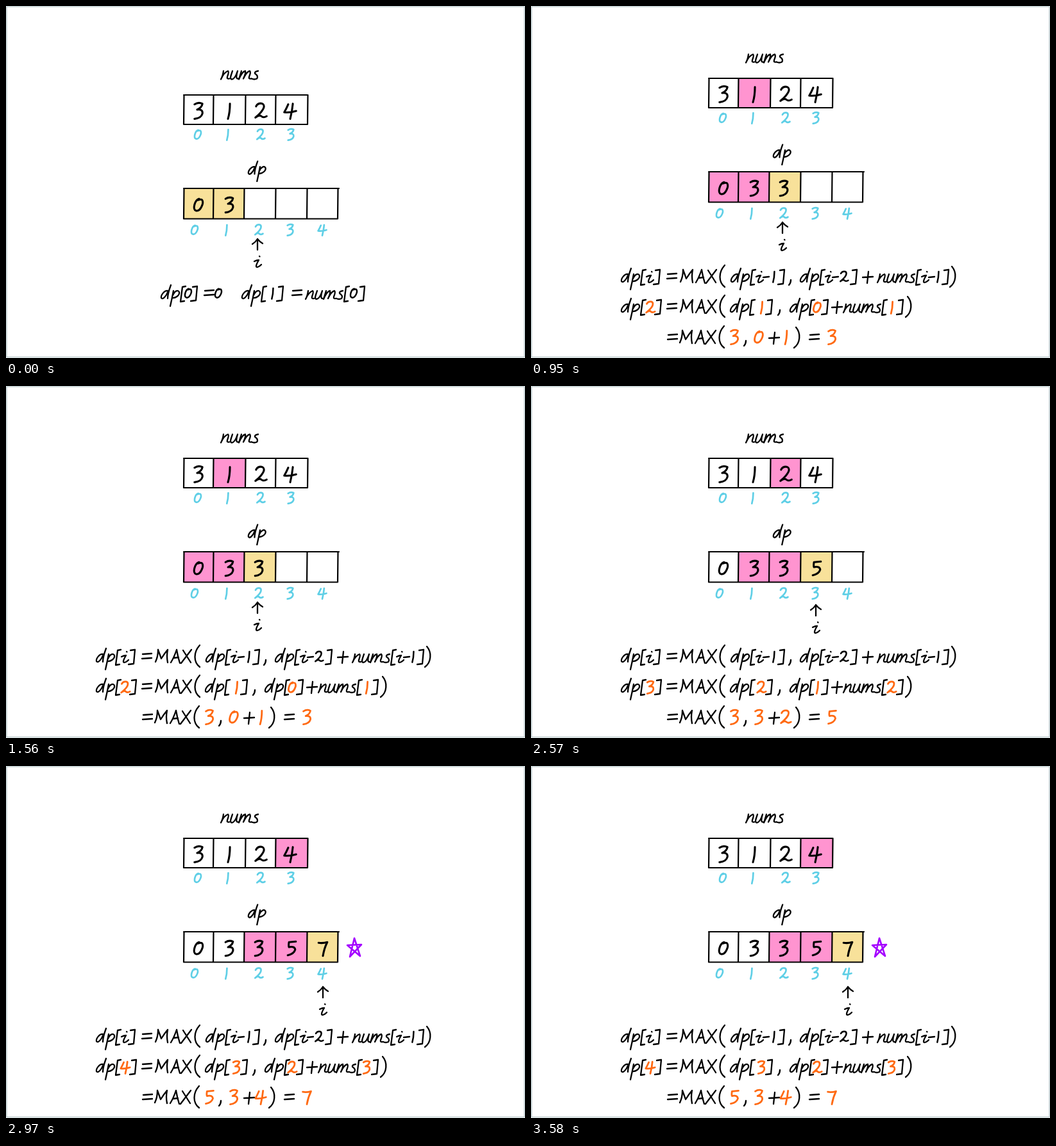
An HTML page for the animation above (3980 ms loop, 809 by 550 pixels).

```html
<!DOCTYPE html>
<html lang="en">
<head>
<meta charset="utf-8">
<title>Dynamic programming, step by step</title>
<style>
  html, body { margin: 0; width: 100%; height: 100%; overflow: hidden; background: #fff; }
  svg { display: block; width: 100%; height: 100%; }
  path { fill: none; stroke-linecap: round; stroke-linejoin: round; vector-effect: non-scaling-stroke; }
</style>
</head>
<body>
<svg id="stage" viewBox="0 0 809 550" role="img" aria-label="nums 3 1 2 4, dp[i] = MAX(dp[i-1], dp[i-2] + nums[i-1])">
  <rect x="1" y="1" width="807" height="547.5" fill="#fff" stroke="#bfcdd0" stroke-width="1.5"/>
</svg>
<script>
const INK = '#000', BLUE = '#5fcfe6', ORANGE = '#ff6a13';
const PINK = '#ff94d0', YELLOW = '#f8e19a', PURPLE = '#a400ff';
const LOOP = 3980;

// Pen strokes of the handwriting: digits are centred, letters sit on a baseline.
const DIGITS = [
  'M1-10C-6-8-10 7-4 9C3 11 9-3 6-8C5-10 2-9-1-8',
  'M2-11Q2 2-1 12',
  'M-7-7C-4-13 5-13 5-7C5-2-3 6-8 10Q-2 5 1 8Q4 11 9 8',
  'M-6-10Q0-14 6-11Q5-5-2-2Q7-3 6 4Q4 11-6 12',
  'M-3-10Q-6-3-9 2Q0 3 9 0M4-11Q3 0 0 12',
  'M-4-10Q-5-4-4-2Q5-4 6 2Q4 9-6 11M-4-10L7-11',
  '',
  'M-7-9Q0-8 7-10Q2 0 0 12'
];
const LETTERS = {
  d: 'M11-13C6-14 0-6 1-2C3 2 9-5 11-11M16-22C13-14 11-7 11-1',
  p: 'M5-13Q3-2 0 11M4-6C7-13 12-15 14-11C15-6 8-1 3-2',
  i: 'M1-9Q5-11 8-11Q2-1 5 0Q8 0 12-4M9-17l.5.5',
  n: 'M4-13Q3-5 0 0Q5-11 11-13Q13-12 10-4Q9 0 13-1',
  u: 'M4-13C2-7-1 0 3 0C7 0 10-7 12-13C10-7 9 0 13-1',
  m: 'M4-13L0 0Q5-12 10-13Q11-9 7-1Q12-12 17-13Q19-11 16-4Q15 0 19-1',
  s: 'M10-13Q4-12 5-9Q11-5 8-1Q4 1 0-1',
  M: 'M4-20Q4-9 0-1M4-20Q7-12 9-6Q14-14 19-20Q17-10 19 0',
  A: 'M9-20Q5-8 0 0M9-20Q11-8 14 1M4-7L12-8',
  X: 'M3-19L15 0M16-20L0 1'
};
const SIGNS = {
  '[': 'M8-20L3-19L0 4L6 3',
  ']': 'M3-19L10-20L8 2L0 3',
  '(': 'M8-27C-2-16-2-1 8 7',
  ')': 'M3-25C11-16 10 0 0 7',
  '=': 'M1-13L15-14M0-6L15-7',
  '+': 'M0-8L16-9M9-17L7 1',
  '-': 'M0-8L9-9',
  ',': 'M3-4Q3 1 0 4'
};
const ADVANCE = { d: 15, p: 16, i: 12, n: 14, u: 14, m: 20, s: 12, M: 24, A: 16, X: 21, '[': 8 };

const NUMS = [3, 1, 2, 4];
const DP = [0, NUMS[0]];
for (let i = 2; i <= NUMS.length; i++) DP[i] = Math.max(DP[i - 1], DP[i - 2] + NUMS[i - 1]);

const ROWS = {
  nums: { edges: [277, 323, 373, 420, 470], top: 113, bottom: 159, end: 470,
          digitX: [300, 347, 397, 443], digitY: 138, indexX: [299, 345, 397, 444], indexY: 175 },
  dp: { edges: [277, 323, 371, 420, 469, 517], top: 259, bottom: 306.5, end: 519,
        digitX: [300, 348, 394, 445, 494], digitY: 285, indexX: [294, 343, 394, 443, 493], indexY: 324 }
};

const stage = document.getElementById('stage');

function add(parent, tag, attrs) {
  const node = document.createElementNS('http://www.w3.org/2000/svg', tag);
  for (const key in attrs) node.setAttribute(key, attrs[key]);
  parent.append(node);
  return node;
}

function stroke(parent, d, color = INK, width = 2.4, transform = '') {
  add(parent, 'path', { d, stroke: color, 'stroke-width': width, transform });
}

function digit(parent, value, x, y, scale = 0.75, color = INK, width = 2.5) {
  stroke(parent, DIGITS[value], color, width, `translate(${x} ${y}) scale(${scale})`);
}

function word(parent, text, x, y, scale = 1) {
  for (const ch of text) {
    stroke(parent, LETTERS[ch] || SIGNS[ch], INK, 2.3, `translate(${x} ${y}) scale(${scale})`);
    x += (ADVANCE[ch] || 10) * scale;
  }
}

function line(parent, y, parts) {
  for (const [text, x] of parts) {
    if (typeof text === 'number') digit(parent, text, x, y - 9, 0.72);
    else word(parent, text, x, y);
  }
}

function drawRow(parent, row, values, fills) {
  const { edges, top, bottom, end } = row;
  for (const i in fills) {
    const x = edges[i], width = edges[+i + 1] - x;
    add(parent, 'rect', { x, y: top, width, height: bottom - top, fill: fills[i] });
  }
  const sides = edges.map(x => `M${x + 0.5} ${top}L${x} ${bottom}`).join('');
  stroke(parent, `M277 ${top}H${end}M277 ${bottom}H${edges.at(-1)}${sides}`, INK, 2.2);
  values.forEach((v, i) => digit(parent, v, row.digitX[i], row.digitY, row === ROWS.dp ? 0.97 : 1.03, INK, 3.1));
  row.indexX.forEach((x, i) => digit(parent, i, x, row.indexY, 0.72, BLUE, 2.7));
}

function drawBoard(scene, i, start) {
  const board = add(scene, 'g', { transform: `translate(0 ${start ? 26 : 0})` });
  word(board, 'nums', 335, 88.5);
  word(board, 'dp', 377, 237.5, 0.95);
  drawRow(board, ROWS.nums, NUMS, start ? {} : { [i - 1]: PINK });
  drawRow(board, ROWS.dp, DP.slice(0, start ? 2 : i + 1),
    start ? { 0: YELLOW, 1: YELLOW } : { [i - 2]: PINK, [i - 1]: PINK, [i]: YELLOW });
  const x = [392, 444, 494][i - 2], drop = [0, 4, 7][i - 2];
  stroke(board, 'M0 17V0M-8 8Q-3 5 0 0Q4 5 8 7', INK, 2.3, `translate(${x} ${338 + drop})`);
  word(board, 'i', x - 6, 382 + drop);
}

function drawStart(scene) {
  line(scene, 458, [['dp[', 241], [0, 284], [']', 288], ['=', 309], [0, 331],
    ['dp[', 367], [1, 415], [']', 422], ['=', 446], ['nums', 467], ['[', 527], [0, 542], [']', 549]]);
}

function drawFormula(scene, i) {
  line(scene, 432, [['dp[i]', 140], ['=', 212], ['MAX(', 233], ['dp[i-', 311], [1, 378], [']', 385],
    [',', 402], ['dp[i-', 419], [2, 488], [']', 498], ['+', 517], ['nums[i-', 540], [1, 634], [']', 641], [')', 653]]);
  line(scene, 479, [['dp[', 140], [']', 193], ['=', 212], ['MAX(', 233], ['dp[', 310], [']', 366],
    [',', 385], ['dp[', 403], [']', 453], ['+', 469], ['nums[', 487], [']', 570], [')', 584]]);
  line(scene, 527, [['=', 213], ['MAX(', 232], [',', 332], ['+', 371], [')', 410], ['=', 434]]);

  const accent = (value, x, y, scale) => digit(scene, value, x, y, scale, ORANGE, 2.8);
  [[i, 186], [i - 1, 359], [i - 2, 446], [i - 1, 562]].forEach(([v, x]) => accent(v, x, 471, 0.8));
  [[DP[i - 1], 317], [DP[i - 2], 355], [NUMS[i - 1], 397], [DP[i], 469]].forEach(([v, x]) => accent(v, x, 517.5, 0.92));
}

function drawStar(scene) {
  stroke(scene, 'M536 298L543 269L552 297L532 280L554 279Z', PURPLE, 2.6);
}

const STEPS = [
  { from: 0, to: 950, i: 2, start: true },
  { from: 950, to: 1960, i: 2 },
  { from: 1960, to: 2970, i: 3 },
  { from: 2970, to: LOOP, i: 4 }
];

for (const { from, to, i, start } of STEPS) {
  const scene = add(stage, 'g', { opacity: 0 });
  drawBoard(scene, i, start);
  if (start) drawStart(scene);
  else drawFormula(scene, i);
  if (i === NUMS.length) drawStar(scene);

  const key = (opacity, time) => ({ opacity, offset: time / LOOP, easing: 'step-end' });
  scene.animate([key(0, 0), key(1, from), key(0, to), key(0, LOOP)], { duration: LOOP, iterations: Infinity })
    .startTime = 0;
}
</script>
</body>
</html>
```
